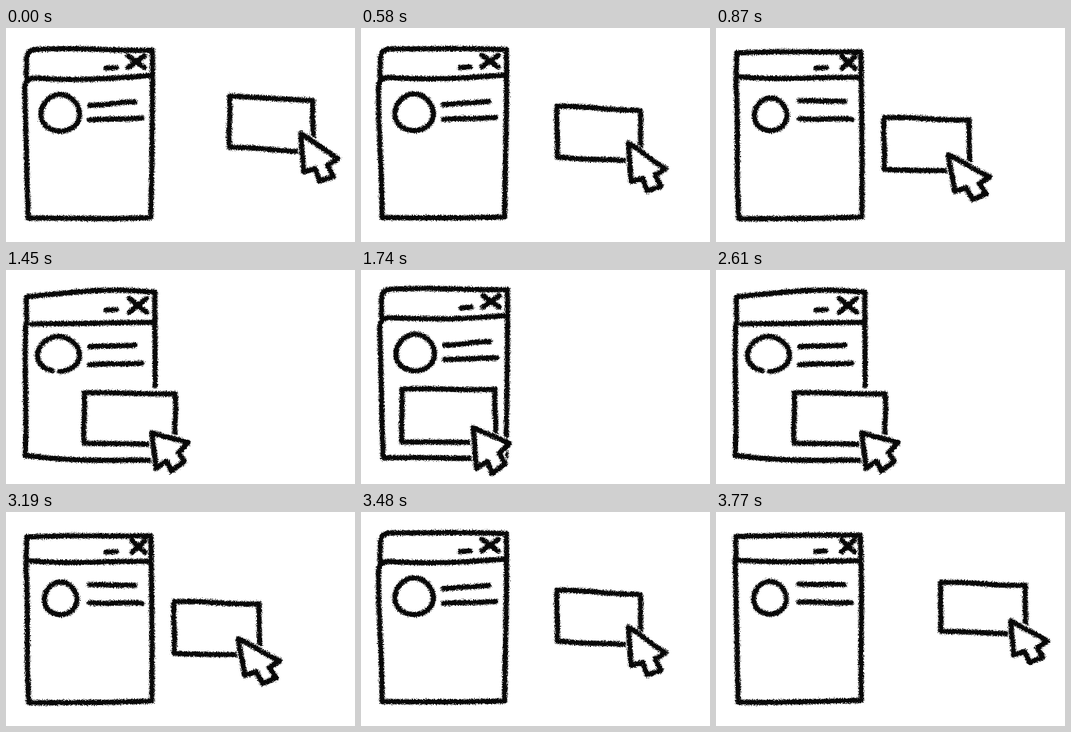
An HTML page for the animation above (4.06 s loop, 598x368 px).

```html
<!DOCTYPE html>
<html lang="en">
<head>
<meta charset="utf-8">
<title>Drag into window</title>
<style>
html, body { margin: 0; width: 100%; height: 100%; overflow: hidden; background: #fff; }
svg { display: block; width: 598px; height: 368px; }
path { fill: none; stroke: #080808; stroke-width: 9; stroke-linecap: round; stroke-linejoin: round; }
.mask { fill: #fff; stroke: #fff; }
</style>
</head>
<body>
<svg viewBox="0 0 598 368">
  <defs>
    <filter id="chalk" filterUnits="userSpaceOnUse" x="0" y="0" width="598" height="368" color-interpolation-filters="sRGB">
      <feTurbulence type="fractalNoise" baseFrequency="0.55" numOctaves="2" seed="4" result="grain"/>
      <feDisplacementMap in="SourceGraphic" in2="grain" scale="8" xChannelSelector="R" yChannelSelector="G"/>
      <feGaussianBlur stdDeviation="0.65"/>
    </filter>
  </defs>
  <g filter="url(#chalk)">
    <rect width="598" height="368" fill="#fff"/>
    <path id="frame"/>
    <path id="cardMask" class="mask" style="stroke-width: 20px"/>
    <path id="card"/>
    <path id="pointerMask" class="mask" style="stroke-width: 14px"/>
    <path id="pointer"/>
  </g>
</svg>
<script>
const STEP = 290, LOOP = 4060;

// Three hand drawings of the window; bows bend the top, bar and bottom edges.
const round = {
  tl: [35, 37], tr: [251, 38], bl: [38, 327], br: [248, 326], left: 32, radius: 18,
  bar: [[50, 86], [247, 82]], bows: [-1, 4, 1],
  cross: [223, 58, 14, 10], face: [93, 146.5, 33, 31.5], text: [133, 127, 158, 155]
};
const square = {
  tl: [35, 43], tr: [248, 41], bl: [39, 328], br: [250, 325], left: 34, radius: 0,
  bar: [[40, 84], [243, 85]], bows: [-1, 2, 1],
  cross: [227, 59.5, 11, 10], face: [93.5, 149, 28, 28], text: [125, 126, 156, 157]
};
const loose = {
  tl: [35, 46], tr: [255, 38], bl: [33, 319], br: [254, 327], left: 34, radius: 0,
  bar: [[44, 93], [252, 90]], bows: [-6, 0, 4],
  cross: [226, 61, 15, 12], face: [90, 145, 36, 30], gap: 0.35, text: [132, 129, 163, 160]
};

// card: x, y, width, height, tilt. tip, across and down place the arrow.
const start = { card: [383, 117, 143, 88, 8], tip: [505, 181], across: [64, 44], down: [5, 66] };
const lift = { card: [385, 121, 145, 84, 5], tip: [505, 187], across: [63, 35], down: [5, 59] };
const move = { card: [288, 154, 146, 89, 4], tip: [398, 218], across: [71, 38], down: [11, 63] };
const enter = { card: [134, 211, 156, 87, 2], tip: [250, 280], across: [62, 17], down: [7, 61] };
const drop = { card: [70, 205, 160, 91, 0], tip: [192, 271], across: [62, 27], down: [6, 70] };

// Arrow outline in units of its across and down edges.
const arrow = [[0, 0], [1, 0], [0.69, 0.37], [0.83, 0.57], [0.43, 0.96], [0.33, 0.7], [0, 1]];

let seed = 1;
function jitter(size) {
  seed = (seed * 16807) % 2147483647;
  return (seed / 2147483647 * 2 - 1) * size;
}

const polygon = points => 'M' + points.join('L') + 'Z';

// Pencil line with a bow and a slight wave across its direction.
function line([x1, y1], [x2, y2], bow = 0) {
  const dx = x2 - x1, dy = y2 - y1, len = Math.hypot(dx, dy);
  const wave = jitter(Math.min(1, len / 100));
  const points = [];
  for (let i = 0; i <= 16; i++) {
    const t = i / 16;
    const off = (bow * Math.sin(Math.PI * t) + wave * Math.sin(2 * Math.PI * t)) / len;
    points.push([x1 + dx * t - dy * off, y1 + dy * t + dx * off]);
  }
  return 'M' + points.join('L');
}

const outline = points => points.map((p, i) => line(p, points[(i + 1) % points.length])).join('');

function ring([cx, cy, rx, ry], gap = 0) {
  const points = [];
  for (let i = 0; i <= 40; i++) {
    const a = 1.7 + gap / 2 + (2 * Math.PI - gap) * i / 40;
    const r = 1 + 0.02 * Math.sin(3 * a);
    points.push([cx + rx * r * Math.cos(a), cy + ry * r * Math.sin(a)]);
  }
  return 'M' + points.join('L');
}

function drawWindow({ tl, tr, bl, br, left, radius: r, bar: [b1, b2], bows, cross, face, gap, text }) {
  const [cx, cy, w, h] = cross;
  const parts = [
    line([tl[0] + r, tl[1]], tr, bows[0]),
    line([tl[0], tl[1] + r], [tl[0], b1[1]]),
    line(b1, b2, bows[1]),
    line([left, b1[1] + r], bl),
    line(tr, br, -1),
    line(bl, br, bows[2]),
    line([172, 69], [189, 68]),
    line([cx - w, cy - h], [cx + w, cy + h]),
    line([cx + w, cy - h], [cx - w, cy + h]),
    line([143, text[0]], [221, text[1]]),
    line([143, text[2]], [233, text[3]]),
    ring(face, gap)
  ];
  if (r) {
    parts.push(`M${tl[0]} ${tl[1] + r}Q${tl} ${tl[0] + r} ${tl[1]}`);
    parts.push(`M${left} ${b1[1] + r}Q${left} ${b1[1]} ${b1}`);
  }
  return parts.join('');
}

function pose(look, [wx, wy], drag, [dx, dy]) {
  const [x, y, w, h, tilt] = drag.card;
  const box = [[x, y], [x + w, y + tilt], [x + w, y + h + tilt], [x, y + h]];
  const tip = arrow.map(([a, b]) => drag.tip.map((v, i) => v + a * drag.across[i] + b * drag.down[i]));
  const shift = `translate(${dx} ${dy})`;
  return {
    frame: [drawWindow(look), `translate(${wx} ${wy})`],
    cardMask: [polygon(box), shift],
    card: [outline(box), shift],
    pointerMask: [polygon(tip), shift],
    pointer: [outline(tip), shift]
  };
}

const poses = [
  pose(round, [0, 0], start, [0, 0]),
  pose(square, [-1, -1], lift, [0, 0]),
  pose(round, [-2, -1], start, [-47, 17]),
  pose(square, [0, 0], move, [0, 0]),
  pose(round, [-2, 1], lift, [-189, 74]),
  pose(loose, [0, 0], enter, [0, 0]),
  pose(round, [0, -4], drop, [0, 0]),
  pose(square, [0, 0], move, [-212, 62])
];

let shown = -1;

function draw(time) {
  const k = Math.floor((time % LOOP) / STEP);
  const n = Math.min(k, LOOP / STEP - k); // out and back again
  if (n === shown) return;
  shown = n;
  for (const [id, [d, transform]] of Object.entries(poses[n])) {
    const el = document.getElementById(id);
    el.setAttribute('d', d);
    el.setAttribute('transform', transform);
  }
}

function tick(now) {
  draw(now);
  requestAnimationFrame(tick);
}
draw(0);
requestAnimationFrame(tick);
</script>
</body>
</html>
```
